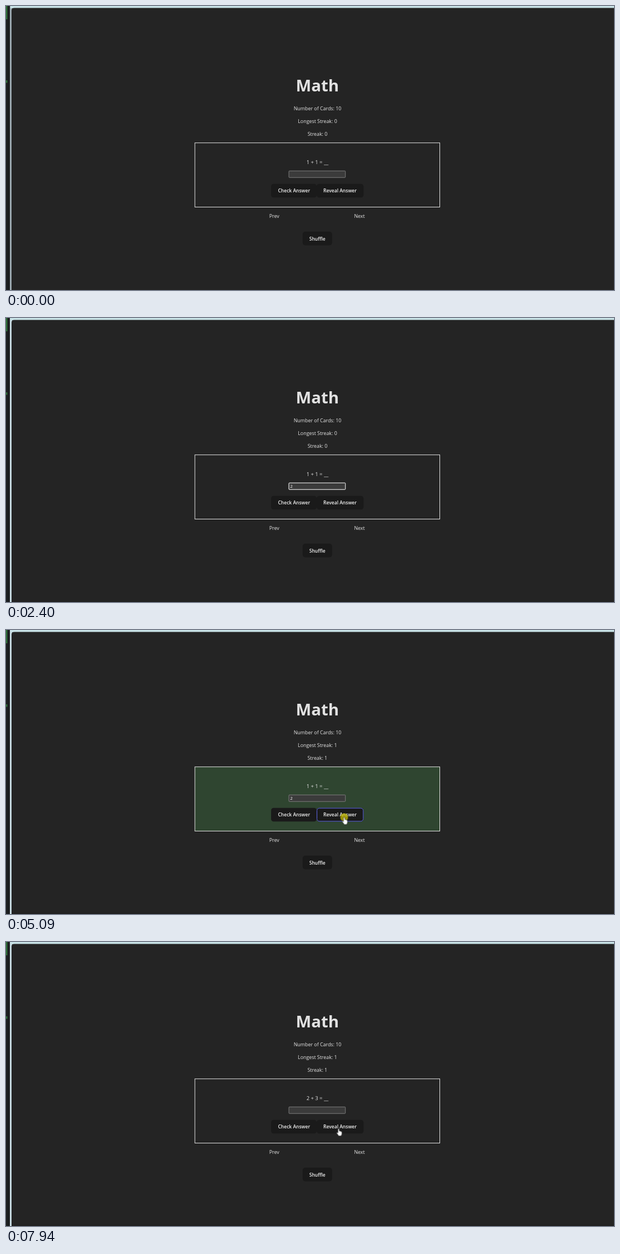
An HTML page for the animation above (8000 ms loop, 1094 by 512 pixels).

```html
<!DOCTYPE html>
<html lang="en">
<head>
<meta charset="utf-8">
<title>Math flashcards</title>
<style>
  html, body { margin: 0; width: 100%; height: 100%; overflow: hidden; background: #242424; }
  svg { display: block; width: 1094px; height: 512px; }
  text { font: 8.85px "Open Sans", "Noto Sans", sans-serif; fill: #e6e6e6; text-anchor: middle; }
  .title { font-size: 29.4px; font-weight: 700; fill: #e2e2e2; }
  .formula { font-size: 9.4px; }
  .value { font-size: 8px; text-anchor: start; fill: #fff; }
  .button { fill: #1a1a1a; }
  .label { font-size: 8.5px; font-weight: 600; fill: #f4f4f4; }
  .ring { fill: none; stroke: #5f66e8; }

  /* Hard state changes, all on one 8 s clock */
  .step { animation: 8s step-end infinite; }
  .frame { animation-name: focus-window; }
  .edge { animation-name: late; }
  .before { animation-name: before; }
  .after { animation-name: after; }
  .ask { animation-name: ask; }
  .answer { animation-name: answer; }
  .first { animation-name: first; }
  .second { animation-name: second; }
  .value { animation-name: typed; }
  .active { animation-name: active; }
  .check-ring { animation-name: check-ring; }
  .reveal-ring { animation-name: reveal-ring; }
  .arrow { animation-name: arrow; }
  .hand { animation-name: hand; }
  .beam { animation-name: beam; }
  .click { animation-name: click; }

  /* Continuous changes */
  .card { animation: flash 8s linear infinite; }
  .pointer { animation: move 8s linear infinite; }

  @keyframes focus-window { 0% { fill: #9ba9b0 } 20.875%, 100% { fill: #c6dae1 } }
  @keyframes late { 0% { opacity: 0 } 20.875%, 100% { opacity: 1 } }
  @keyframes before { 0% { opacity: 1 } 46.875%, 100% { opacity: 0 } }
  @keyframes after { 0% { opacity: 0 } 46.875%, 100% { opacity: 1 } }
  @keyframes ask { 0%, 72.875%, 83.75%, 100% { opacity: 1 } 64.375%, 77% { opacity: 0 } }
  @keyframes answer { 0%, 72.875%, 83.75%, 100% { opacity: 0 } 64.375%, 77% { opacity: 1 } }
  @keyframes first { 0% { opacity: 1 } 96%, 100% { opacity: 0 } }
  @keyframes second { 0% { opacity: 0 } 96%, 100% { opacity: 1 } }
  @keyframes typed { 0%, 96%, 100% { opacity: 0 } 28.375% { opacity: 1 } }
  @keyframes active { 0%, 43.5%, 100% { opacity: 0 } 21.75% { opacity: 1 } }
  @keyframes check-ring { 0%, 14%, 62.875%, 100% { opacity: 0 } 12%, 38.75% { opacity: 1 } }
  @keyframes reveal-ring { 0%, 12%, 95.125%, 100% { opacity: 0 } 11%, 61.5% { opacity: 1 } }
  @keyframes arrow { 0%, 11%, 100% { opacity: 0 } .875% { opacity: 1 } }
  @keyframes hand { 0%, 20%, 100% { opacity: 0 } 11%, 38% { opacity: 1 } }
  @keyframes beam { 0%, 29.125%, 38%, 100% { opacity: 0 } 20%, 33.5% { opacity: 1 } }
  @keyframes click {
    0%, 21.75%, 46.875%, 64.375%, 72.875%, 77.875%, 96%, 100% { opacity: 0 }
    20.875%, 45.125%, 62.875%, 71.125%, 77%, 95.125% { opacity: 1 }
  }
  @keyframes flash {
    0%, 46.87% { fill: #242424 }
    46.875% { fill: #4caf50 }
    53.5% { fill: #418a45 }
    63.625% { fill: #2f4530 }
    69%, 100% { fill: #242424 }
  }
  @keyframes move {
    0%, .875% { transform: translate(910px, 476px) }
    2.375%, 4.875% { transform: translate(792px, 441px) }
    8% { transform: translate(680px, 386px) }
    11% { transform: translate(592px, 344px) }
    12.5% { transform: translate(548px, 328px) }
    14%, 15% { transform: translate(526px, 313px) }
    15.75%, 19.25% { transform: translate(528px, 310px) }
    21%, 27.5% { transform: translate(530px, 304.5px) }
    29.125%, 36.75% { transform: translate(527.5px, 304.5px) }
    39% { transform: translate(525px, 322px) }
    41.75%, 48.625% { transform: translate(522px, 331px) }
    51%, 53.75% { transform: translate(518.5px, 326px) }
    56% { transform: translate(540px, 346px) }
    58.5% { transform: translate(590px, 362px) }
    60% { transform: translate(602px, 355px) }
    62%, 64.375% { transform: translate(608.5px, 337.5px) }
    68.5%, 82.125% { transform: translate(606.5px, 337px) }
    84.5% { transform: translate(622px, 356px) }
    88% { transform: translate(646px, 379px) }
    91.875%, 96.5% { transform: translate(638px, 380px) }
    99.25%, 100% { transform: translate(598.5px, 336.5px) }
  }
</style>
</head>
<body>
<svg viewBox="0 0 1094 512">
  <rect width="1094" height="512" fill="#1b1e20"/>
  <path d="M0 0H2.5V24H0ZM0 134H2.5V138.5H0Z" fill="#2c6d37"/>
  <rect class="step frame" x="7" width="4" height="512"/>
  <rect x="8" width="1086" height="4" fill="#c8e2e6"/>
  <path d="M10 512V8Q10 3.5 15 3.5H1094V512Z" fill="#242424"/>
  <rect class="step edge" x="10" y="510" width="1084" height="2" fill="#1f1f1f"/>

  <text class="title" x="560.3" y="154">Math</text>
  <text x="560.5" y="187.7">Number of Cards: 10</text>
  <g class="step before">
    <text x="560.5" y="210.9">Longest Streak: 0</text>
    <text x="560.5" y="234">Streak: 0</text>
  </g>
  <g class="step after">
    <text x="560.3" y="210.9">Longest Streak: 1</text>
    <text x="560.3" y="234">Streak: 1</text>
  </g>

  <rect class="card" x="339.9" y="246.7" width="440.6" height="115.8" stroke="#e4e4e4"/>
  <rect x="509" y="297.3" width="101.7" height="11.9" rx="1" fill="#3b3b3b" stroke="#7d7d7d"/>
  <rect class="step active" x="509" y="297.3" width="101.7" height="11.9" rx="1" fill="none" stroke="#e8e8e8"/>
  <text class="step value" x="511.2" y="306.2">2</text>

  <g class="step ask">
    <text class="step formula first" x="560.5" y="284.8">1 + 1 = __</text>
    <text class="step formula second" x="560.5" y="284.8">2 + 3 = __</text>
    <rect class="button" x="477" y="320.7" width="82" height="24.6" rx="4.6"/>
    <rect class="button" x="559" y="320.7" width="84.3" height="24.6" rx="4.6"/>
    <rect class="step ring check-ring" x="477.5" y="321.2" width="81.2" height="23.6" rx="4.4"/>
    <rect class="step ring reveal-ring" x="559.5" y="321.2" width="83.3" height="23.6" rx="4.4"/>
    <text class="label" x="518.3" y="336.3">Check Answer</text>
    <text class="label" x="601" y="336.3">Reveal Answer</text>
  </g>
  <g class="step answer">
    <text class="formula" x="560.3" y="284.8">2</text>
    <rect class="button" x="476" y="320.7" width="82" height="24.6" rx="4.6"/>
    <rect class="button" x="558" y="320.7" width="86.5" height="24.6" rx="4.6"/>
    <rect class="ring" x="558.3" y="321.2" width="85.7" height="23.6" rx="4.4"/>
    <text class="label" x="517" y="336.3">Check Answer</text>
    <text class="label" x="601" y="336.3">Show Question</text>
  </g>

  <text x="482.8" y="382.4">Prev</text>
  <text x="636" y="382.4">Next</text>
  <rect class="button" x="533.7" y="406.8" width="53" height="24.6" rx="4.6"/>
  <text class="label" x="560.2" y="422.8">Shuffle</text>

  <g class="pointer">
    <circle class="step click" r="7" fill="#c8be00" fill-opacity=".75"/>
    <path class="step arrow" d="M0 0V10L2.3 7.9 3.9 11.3 5.3 10.6 3.8 7.3H7Z" fill="#fff" stroke="#111" stroke-width=".4"/>
    <path class="step hand" d="M-1.1 1Q-1.1 0 0 0T1.1 1V4.3Q2.2 3.7 2.8 4.7 3.8 4.2 4.4 5.2 5.9 4.9 5.9 6.4V9.4Q5.7 11 4.9 11.7V13H-.6V11.8L-3.3 8.2Q-3.8 6.9-2.5 6.8L-1.1 8Z" fill="#fff" stroke="#111" stroke-width=".5"/>
    <path class="step beam" d="M-2-4.5H2M0-4.5V4.5M-2 4.5H2" fill="none" stroke="#eee" stroke-width=".9"/>
  </g>
</svg>
</body>
</html>
```
